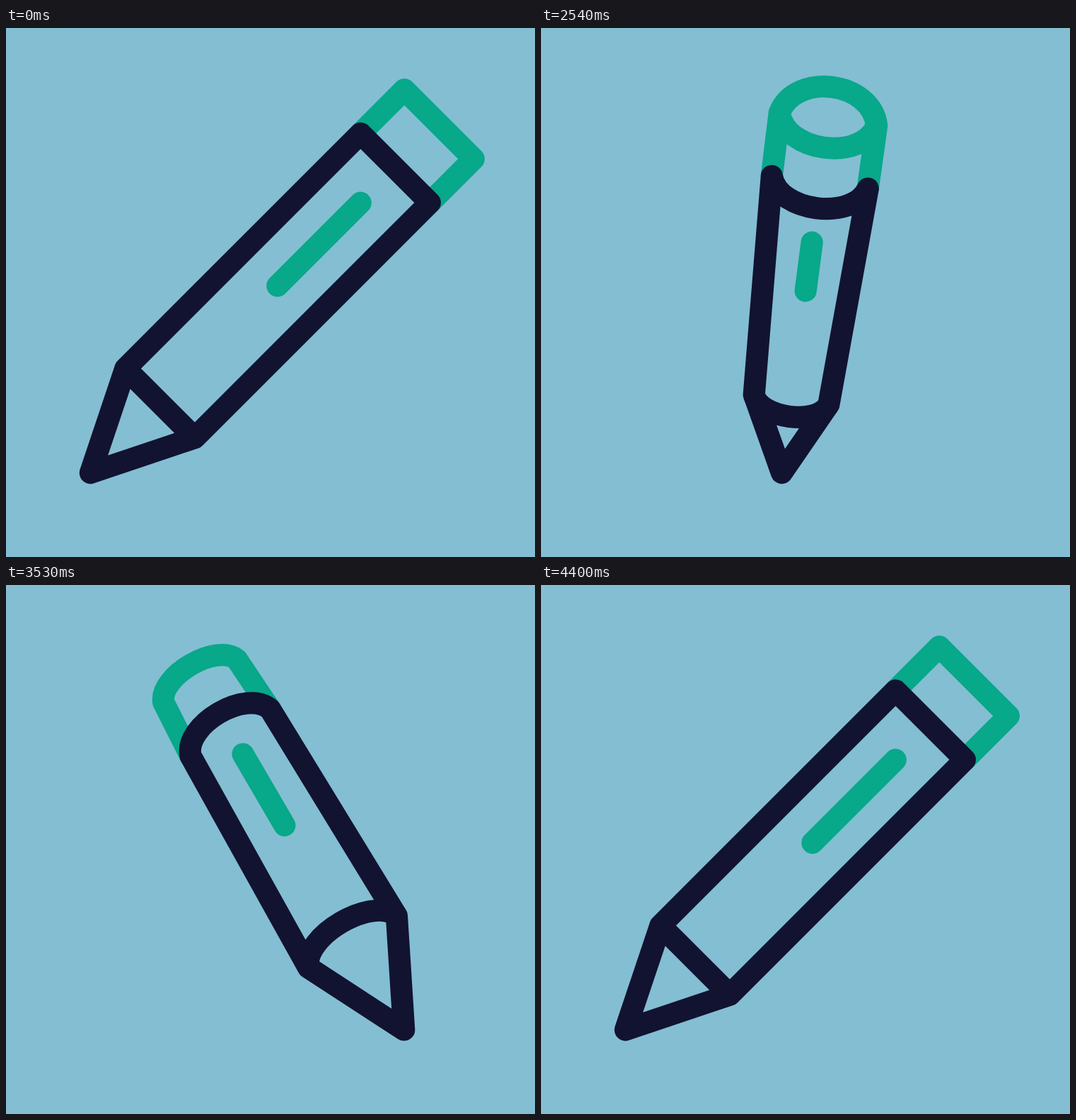
These frames come from a looping animation (748x748 px, 4.43 s). An HTML page:

```html
<!DOCTYPE html>
<html lang="en">
<head>
<meta charset="utf-8">
<title>Pencil</title>
<style>
  html, body { margin: 0; width: 100%; height: 100%; overflow: hidden; background: #84bed2; }
  svg { display: block; width: 100%; height: 100%; }
  path { fill: none; stroke-width: 31.2; stroke-linecap: round; stroke-linejoin: round; }
  .green { stroke: #08a88a; }
  .navy { stroke: #121331; }
</style>
</head>
<body>
<svg viewBox="0 0 748 748">
  <g id="pencil">
    <path id="eraser" class="green"/>
    <path id="body" class="navy"/>
    <path id="shine" class="green"/>
  </g>
</svg>
<script>
const LOOP = 4430, REST = 2000, SWING = 1200, STEP = 30;
const LEFT = 119.4, TRAVEL = 530, TIP_Y = 629, LEAN = 45;

// Upright pencil with its tip at the origin.
// Rings are [height, half width, bow of the arc]; bow > 0 arches upwards.
const flat = {
  cap: [697, 69.3, 0], rim: [697, 69.3, 0],
  top: [609.5, 69.3, 0], base: [139.3, 69.3, 0], shine: [540, 374]
};
const front = {
  cap: [501, 69.3, 62], rim: [501, 69.3, -55],
  top: [411, 68.5, -50], base: [104, 53, -33], shine: [325, 257.5]
};
const back = {
  cap: [501, 55, 55], rim: [501, 55, 55],
  top: [418, 63, 67], base: [147, 74, 66], shine: [402, 313]
};

const $ = id => document.getElementById(id);
const pencil = $('pencil'), eraser = $('eraser'), body = $('body'), shine = $('shine');

// cubic-bezier(x1, 0, x2, 1)
function ease(x, x1, x2) {
  let lo = 0, hi = 1;
  for (let i = 0; i < 30; i++) {
    const s = (lo + hi) / 2, r = 1 - s;
    if (3 * s * r * (x1 * r + x2 * s) + s * s * s < x) lo = s; else hi = s;
  }
  return lo * lo * (3 - 2 * lo);
}

const mix = (a, b, k) => a.map((v, i) => v + (b[i] - v) * k);
const pt = (x, h) => `${x.toFixed(2)} ${(-h).toFixed(2)}`;
const left = ([h, w]) => pt(-w, h);
const right = ([h, w]) => pt(w, h);
const arc = ([h, w, bow]) =>
  `C${pt(-w * 0.78, h + bow)} ${pt(w * 0.78, h + bow)} ${pt(w, h)}`;

function draw(time) {
  const t = time % LOOP - REST;
  const m = Math.min(Math.max(Math.floor((t + 3) / STEP) * STEP, 0), 2 * SWING);
  const returning = m > SWING;
  const x = (returning ? 2 * SWING - m : m) / SWING;

  // The tip slides and the pencil tilts across the whole swing;
  // the outline turns round until mid-swing and back again.
  const u = ease(x, 0.4, 0.6);
  const k = ease(1 - Math.abs(1 - 2 * x), 0.35, 0.55);
  const pose = returning ? back : front;
  const part = name => mix(flat[name], pose[name], k);
  const cap = part('cap'), rim = part('rim'), top = part('top'), base = part('base');
  const [s0, s1] = part('shine');

  pencil.setAttribute('transform',
    `translate(${LEFT + TRAVEL * u} ${TIP_Y}) rotate(${LEAN * (1 - 2 * u)})`);
  eraser.setAttribute('d',
    `M${left(top)}L${left(cap)}${arc(cap)}L${right(top)}M${left(rim)}${arc(rim)}`);
  body.setAttribute('d',
    `M${left(top)}${arc(top)}L${right(base)}L0 0L${left(base)}ZM${left(base)}${arc(base)}`);
  shine.setAttribute('d', `M${pt(0, s0)}L${pt(0, s1)}`);
}

const start = performance.now();
function tick() {
  draw(performance.now() - start);
  requestAnimationFrame(tick);
}
tick();
</script>
</body>
</html>
```
